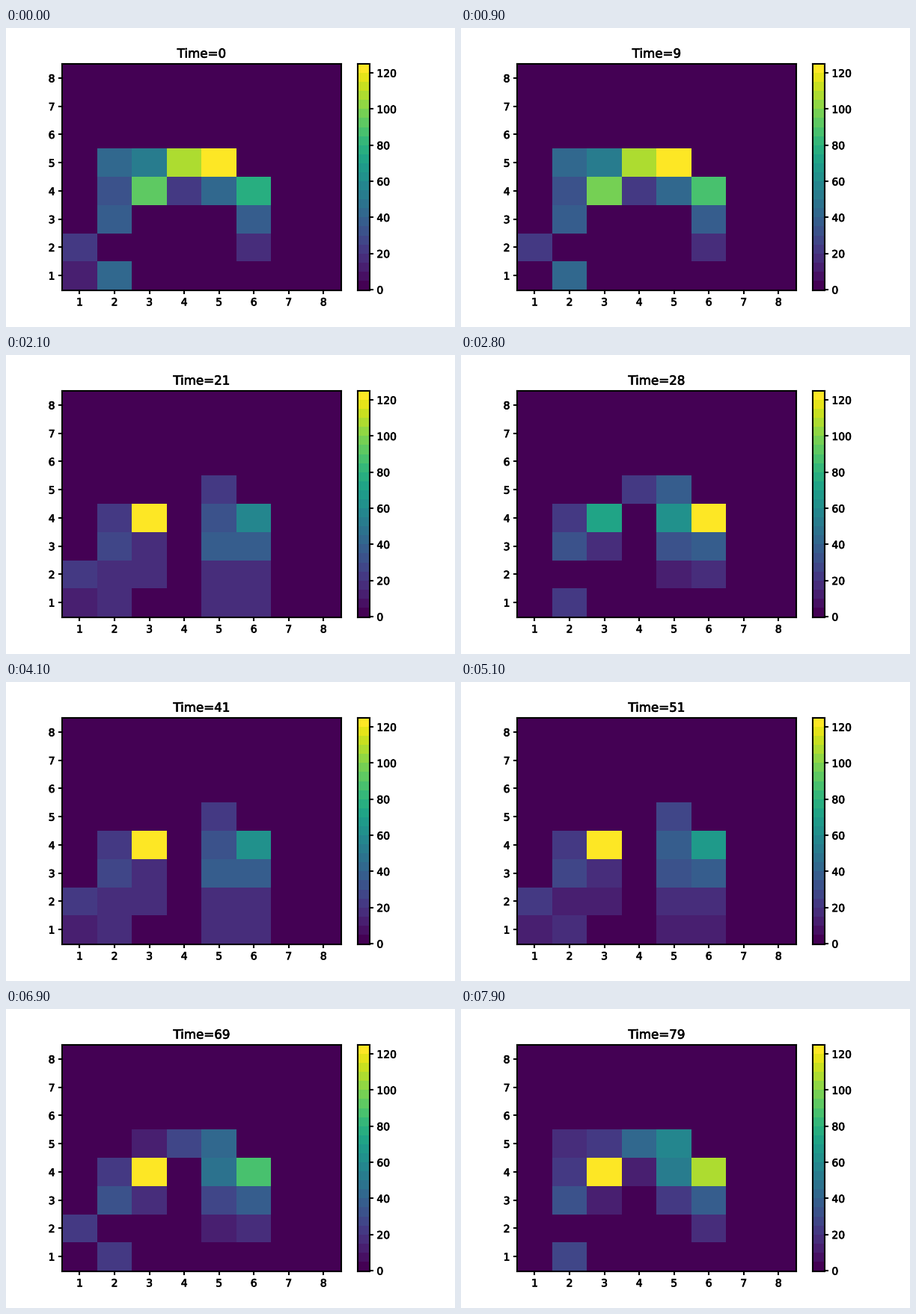
These frames come from a looping animation (600x400 px, 8 s). A matplotlib script:

```python
import numpy as np
import matplotlib.pyplot as plt
from matplotlib.animation import FuncAnimation
from matplotlib.patheffects import withStroke

W, H, DPI = 600, 400, 100
STEPS, LEVELS, BAND = 80, 25, 5
TOP = LEVELS * BAND

plt.rcParams.update({
    "font.family": "DejaVu Sans", "font.size": 10,
    "axes.titlesize": 12, "axes.linewidth": 1.5,
    "xtick.major.width": 1.5, "ytick.major.width": 1.5,
})

# Three drivers steer the whole map: the bridge and its two piers.
KEYS = [0, 9, 21, 28, 41, 60, 79]
BRIDGE = [24, 24, 4, 7, 4, 5, 11]
LEFT = [18, 19, 24, 14, 24, 24, 24]
RIGHT = [15, 17, 11, 24, 12, 14, 21]


def levels_at(t):
    """Colour level of every cell; the busiest one is always at full scale."""
    b, l, r = (np.interp(t, KEYS, d) for d in (BRIDGE, LEFT, RIGHT))
    span = b - 3                           # the bridge thins out to the left
    idle = 24 - b                          # grows as the bridge empties
    spill = idle * max(20 - r, 0) / 55     # ground level, when both are quiet
    rows = [
        [min(2.5, 33 - 2 * r), 2.3 + 0.23 * b, 0, 0, spill, spill],
        [min(4, 21 - r), spill, spill, 0, 0.13 * idle, 3.3],
        [0, 5 + 0.1 * b, 0.17 * idle, 0, idle / 3, 7],
        [0, 3 + 0.13 * b, l, 0.18 * b, r / 2, r],
        [0, 0.38 * span, 0.48 * span, span, b, 0],
    ]
    grid = np.zeros((8, 8))
    grid[:5, :6] = rows
    grid[grid < 1.95] = 0
    return np.rint(grid * (LEVELS - 1) / grid.max())


def to_value(level):
    return (level + 0.5) * BAND


def panel(left, right):
    """Axes between two x positions in stage pixels."""
    base, top = 49.4, 352
    return fig.add_axes([left / W, base / H, (right - left) / W, (top - base) / H])


def embolden(*texts):
    for text in texts:
        text.set_path_effects([withStroke(linewidth=0.5, foreground="black")])


fig = plt.figure(figsize=(W / DPI, H / DPI), dpi=DPI, facecolor="white")
style = dict(cmap=plt.get_cmap("viridis", LEVELS), vmin=0, vmax=TOP)

ax = panel(75.2, 447.55)
edges = np.arange(9) + 0.5
heat = ax.pcolormesh(edges, edges, to_value(levels_at(0)), **style)
ax.set(xlim=(0.5, 8.5), ylim=(0.485, 8.5),
       xticks=range(1, 9), yticks=range(1, 9))
title = ax.set_title("Time=0")

cax = panel(470, 485.7)
cax.pcolormesh([0, 1], np.arange(LEVELS + 1) * BAND,
               to_value(np.arange(LEVELS))[:, None], **style)
cax.set(xlim=(0, 1), ylim=(-0.25, TOP), xticks=[], yticks=range(0, TOP, 20))
cax.yaxis.tick_right()

embolden(title, *ax.get_xticklabels(), *ax.get_yticklabels(),
         *cax.get_yticklabels())


def update(t):
    heat.set_array(to_value(levels_at(t)))
    title.set_text(f"Time={t}")
    return [heat, title]


anim = FuncAnimation(fig, update, frames=STEPS, interval=100,
                     repeat=True, repeat_delay=0, blit=False)
plt.show()
```
